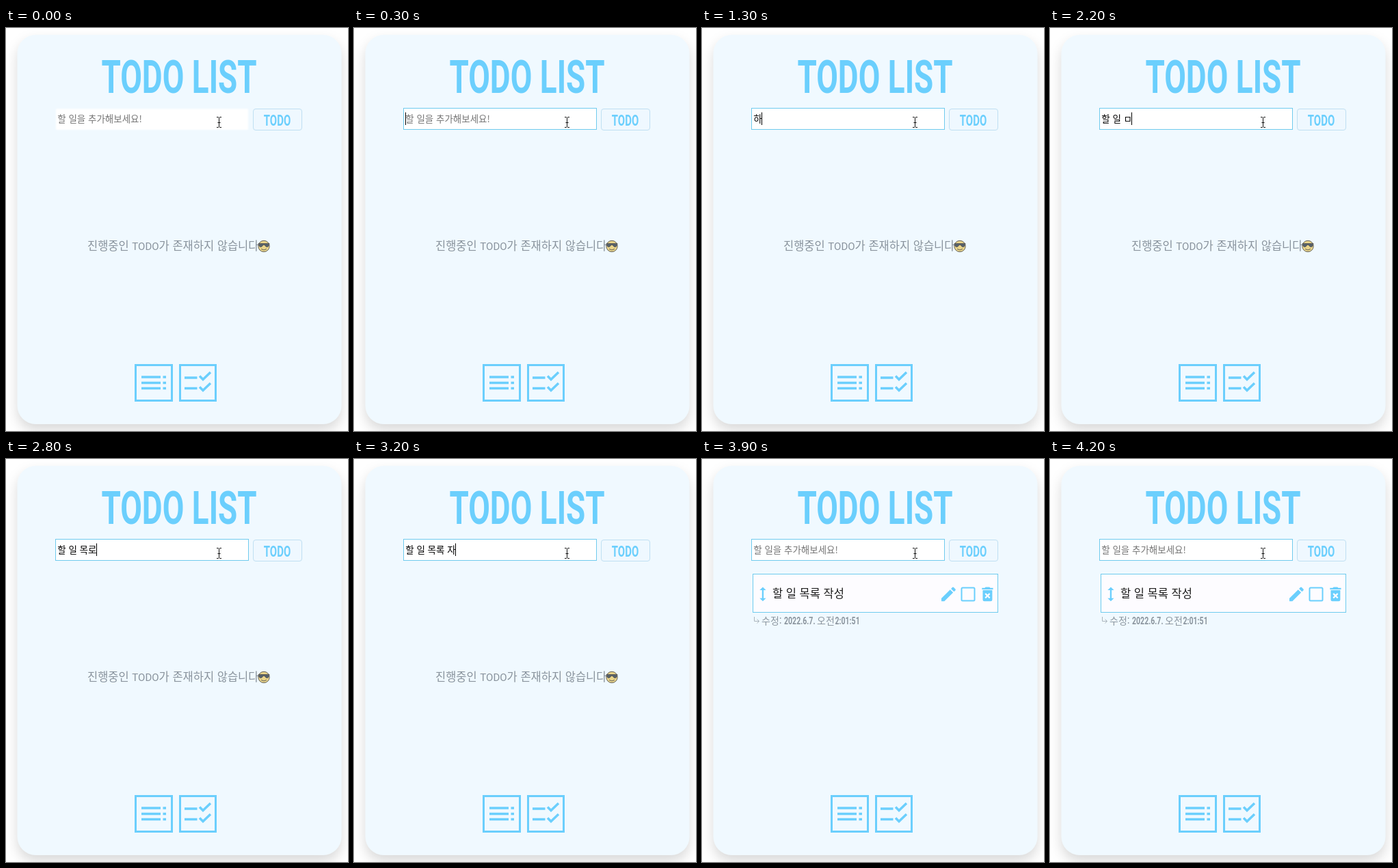
Recreate the animation shown at these times as an HTML page. Size 500 px wide and 590 px high, loop 5000 ms.

```html
<!DOCTYPE html>
<html lang="ko">
<head>
<meta charset="utf-8">
<title>Todo list</title>
<style>
  html, body { margin: 0; height: 100%; overflow: hidden; background: #fff; }
  svg { display: block; width: 500px; height: 590px; }
  text { font-family: 'Noto Sans CJK KR', 'Noto Sans CJK', 'Noto Sans', sans-serif; white-space: pre; }
  .narrow { font-family: Roboto, sans-serif; font-weight: 700; }
  .card { fill: #f0f9ff; filter: drop-shadow(0 9px 9px rgba(0, 0, 0, .15)); }
  .blue { fill: #6bcffd; }
  .line { fill: none; stroke: #6bcffd; }
  .small { font-size: 14px; fill: #8b959e; }
  .idle { fill: #fff; filter: blur(1.2px); }
  #field { font-size: 13.5px; }
</style>
</head>
<body>
<svg viewBox="0 0 500 590">
  <rect class="card" x="16.5" y="10" width="474" height="570" rx="27"/>

  <!-- The narrow display face is Roboto condensed by one common factor -->
  <g class="narrow blue" text-anchor="middle">
    <text class="narrow" transform="translate(253 95) scale(.68 1)" font-size="67.5">TODO LIST</text>
    <rect x="361.5" y="118.5" width="71" height="31" rx="3.5" fill="#eff8ff" stroke="#bfdff2"/>
    <text class="narrow" transform="translate(396.5 143) scale(.68 1)" font-size="22">TODO</text>
  </g>

  <rect id="idle" class="idle" x="73" y="118.5" width="281" height="30.5"/>
  <rect id="focus" x="72.5" y="117.5" width="282" height="31" fill="#fff" stroke="#6fcbee"/>
  <text id="field" x="75.2" y="137.5"></text>
  <path id="caret" d="M0 123.5V142" stroke="#000"/>

  <g id="empty">
    <text x="119" y="325" font-size="16.5" fill="#89939c">진행중인 <tspan font-family="Roboto, sans-serif" font-size="15">TODO</tspan>가 존재하지 않습니다</text>
    <g stroke="#62605a">
      <circle cx="377" cy="319.5" r="8.2" fill="#ead58a"/>
      <path d="M369 315.5h16l-.8 3.5q-3 3.5-5.7-.8l-1.5-.9-1.5.9q-2.7 4.3-5.7.8z" fill="#56616a"/>
      <path d="M373 323.5q4 3 8 0" fill="none"/>
    </g>
  </g>

  <g id="item">
    <rect x="74.5" y="168.5" width="358" height="56" fill="#fdfcff" stroke="#6fcbee"/>
    <text x="103" y="203" font-size="16.5" fill="#1c1c1c">할 일 목록 작성</text>
    <g class="blue">
      <path transform="translate(75 184) scale(1.16)" d="M13 7h3l-4-4-4 4h3v10H8l4 4 4-4h-3z"/>
      <path transform="translate(346.5 184) scale(1.16)" d="M3 17.25V21h3.75L17.8 9.95 14.05 6.2zM20.7 7.05a1 1 0 0 0 0-1.4L18.35 3.3a1 1 0 0 0-1.4 0l-1.8 1.8 3.75 3.75z"/>
      <path transform="translate(403.5 184) scale(1.16)" fill-rule="evenodd" d="M6 19a2 2 0 0 0 2 2h8a2 2 0 0 0 2-2V7H6zm2.5-7.1 1.4-1.4 2.1 2.1 2.1-2.1 1.4 1.4-2.1 2.1 2.1 2.1-1.4 1.4-2.1-2.1-2.1 2.1-1.4-1.4 2.1-2.1zM15.5 4l-1-1h-5l-1 1H5v2h14V4z"/>
    </g>
    <rect class="line" x="379.5" y="188.5" width="19" height="19" rx="1.5" stroke-width="2"/>
    <path d="M76.5 231v6.5h7m-3-3 3 3-3 3" fill="none" stroke="#abb5bd"/>
    <text class="small" x="87" y="241.5">수정:</text>
    <text class="small" x="168" y="241.5">오전</text>
    <g fill="#8b959e" font-size="15.5">
      <text class="narrow" transform="translate(120 242) scale(.68 1)">2022.6.7.</text>
      <text class="narrow" transform="translate(194.5 242) scale(.68 1)">2:01:51</text>
    </g>
  </g>

  <g class="line" stroke-width="3">
    <path d="M189.5 493.5h53v52h-53zM254.5 493.5h52v52h-52z"/>
    <path stroke-width="3.5" d="M198 511h28m3.5 0h4.5M198 519.5h28m3.5 0h4.5M198 527.5h28m3.5 0h4.5"/>
    <path stroke-width="3.5" d="M261 512h18.500M261 527.500h18.500M283 509.500l5 5 11-10.500M283 525.500l5 5 11-10.500"/>
  </g>

  <path d="M308 130.500h2.500l1 1 1-1h2.500M308 145.500h2.500l1-1 1 1h2.500M311.500 131v14M309.500 138.500h4" fill="none" stroke="#111"/>
</svg>
<script>
const LOOP = 5000, FOCUS = 100, CARET_OFF = 700, TYPE = 1000, SUBMIT = 3900;
const PLACEHOLDER = '할 일을 추가해보세요!';

// Each keystroke of the Korean input method: [time, composed text]
const keys = [
  [1000, 'ㅎ'], [1300, '하'], [1400, '할'],
  [1800, '할 '], [1900, '할 ㅇ'], [2000, '할 일'], [2100, '할 일 '],
  [2200, '할 일 ㅁ'], [2300, '할 일 모'], [2400, '할 일 목'], [2500, '할 일 목ㄹ'],
  [2800, '할 일 목로'], [2900, '할 일 목록'], [3000, '할 일 목록 '],
  [3100, '할 일 목록 ㅈ'], [3200, '할 일 목록 자'], [3300, '할 일 목록 작'],
  [3500, '할 일 목록 작서'], [3600, '할 일 목록 작성']
];

const el = id => document.getElementById(id);
const field = el('field'), caret = el('caret');
const show = (node, on) => node.setAttribute('visibility', on ? 'visible' : 'hidden');

function draw(t) {
  const typing = t >= TYPE && t < SUBMIT;
  const value = typing ? keys.filter(([at]) => at <= t).pop()[1] : '';
  const text = value || PLACEHOLDER;
  if (field.textContent !== text) field.textContent = text;
  field.setAttribute('fill', typing ? '#000' : '#757575');

  const end = typing ? field.getComputedTextLength() : 0;
  caret.setAttribute('transform', `translate(${Math.floor(75 + end) + .5})`);
  show(caret, typing || (t >= FOCUS && t < CARET_OFF));
  show(el('idle'), t < FOCUS);
  show(el('focus'), t >= FOCUS);
  show(el('empty'), t < SUBMIT);
  show(el('item'), t >= SUBMIT);
}

function tick() {
  draw(performance.now() % LOOP);
  requestAnimationFrame(tick);
}
tick();
</script>
</body>
</html>
```
